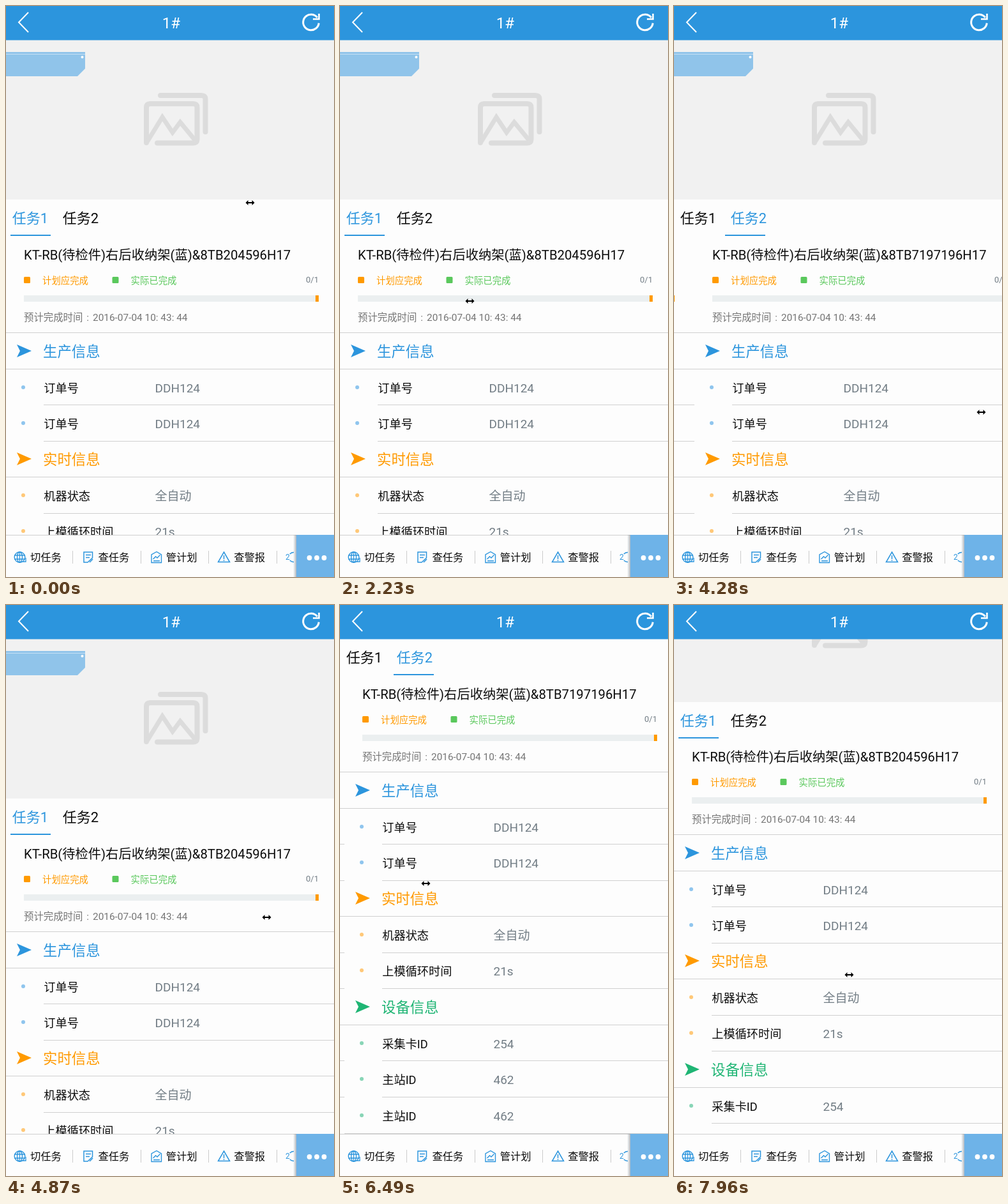
Write an HTML page with a canvas that moves like this. It is 514x894 px and loops after 8000 ms.

```html
<!DOCTYPE html>
<html lang="zh-CN">
<head>
<meta charset="utf-8">
<title>任务</title>
<style>
html, body { margin: 0; width: 100%; height: 100%; overflow: hidden; background: #fdfdfd; }
canvas { display: block; width: 514px; height: 894px; }
</style>
</head>
<body>
<canvas id="stage" width="514" height="894"></canvas>
<script>
const ctx = document.getElementById('stage').getContext('2d');
const W = 514, H = 894, TOP = 53, BOTTOM = 828, PHOTO = 250;
const PITCH = W + 7, ROW = 56.55;
const LOOP = 8000, STEP = 147.4;
const BLUE = '#2c95dd', ORANGE = '#ff9a00', LIME = '#5ac85c', GREEN = '#1fb574';
const PAPER = '#fdfdfd', INK = '#0c0c0c', GREY = '#727d85', TONE = '#dcdcdc';
const FONT = 'Roboto, "Noto Sans CJK SC", "Noto Sans CJK JP", sans-serif';

const titles = ['KT-RB(待检件)右后收纳架(蓝)&8TB204596H17', 'KT-RB(待检件)右后收纳架(蓝)&8TB7197196H17'];
const sections = [
  { name: '生产信息', color: BLUE, dot: '#8fc5ee', rows: [['订单号', 'DDH124'], ['订单号', 'DDH124']] },
  { name: '实时信息', color: ORANGE, dot: '#ffc878', rows: [['机器状态', '全自动'], ['上模循环时间', '21s']] },
  { name: '设备信息', color: GREEN, dot: '#88d5b6', rows: [['采集卡ID', '254'], ['主站ID', '462'], ['主站ID', '462']] }
];

// Motion, in steps of STEP ms
const ease = u => { u = Math.min(1, Math.max(0, u)); return u * u * (3 - 2 * u); };
const visits = [18, 24.86, 29.45, 44.2];   // moments when the second page is fully in view
const pageAt = i => Math.max(...visits.map(v => ease(1 - Math.abs(i - v) / 3)));
const scrollAt = i => PHOTO * ease((i - 33) / 3) - 98.5 * ease((i - 48) / 6);
const pointer = [[0, 382.5, 308], [8, 101, 531], [15, 203.5, 462], [24, 328.5, 580],
  [29, 481.5, 636], [36, 360.5, 393], [44, 134.5, 436], [54, 274.5, 579]];

function pointerAt(i) {
  const n = Math.max(1, pointer.findIndex(k => k[0] >= i));
  const [i0, x0, y0] = pointer[n - 1], [i1, x1, y1] = pointer[n];
  const u = ease((i - i0) / (i1 - i0));
  return [x0 + (x1 - x0) * u, y0 + (y1 - y0) * u];
}

function text(str, x, y, size, color, align = 'left') {
  ctx.font = size + 'px ' + FONT;
  ctx.textAlign = align;
  ctx.fillStyle = color;
  ctx.fillText(str, x, y);
}
function rect(x, y, w, h, color) {
  ctx.fillStyle = color;
  ctx.fillRect(x, y, w, h);
}
function fill(path, color) {
  ctx.fillStyle = color;
  ctx.fill(new Path2D(path));
}
function stroke(path, color, width) {
  ctx.strokeStyle = color;
  ctx.lineWidth = width;
  ctx.stroke(new Path2D(path));
}
function oval(x, y, rx, ry) {
  ctx.beginPath();
  ctx.ellipse(x, y, rx, ry, 0, 0, 7);
}
function dot(x, y, r, color) {
  oval(x, y, r, r);
  ctx.fillStyle = color;
  ctx.fill();
}
function inBox(x, y, w, h, paint) {
  ctx.save();
  ctx.beginPath();
  ctx.rect(x, y, w, h);
  ctx.clip();
  paint();
  ctx.restore();
}

function picture() {
  rect(0, TOP, W, PHOTO, '#f1f1f1');
  ctx.lineCap = 'round';
  stroke('M242 140H306Q312.5 140 312.5 146V197', TONE, 8);
  stroke('M220 214V159Q220 153 226 153H293Q299.5 153 299.5 159V208Q299.5 214.5 293 214.5H237', TONE, 8);
  ctx.lineCap = 'butt';
  stroke('M221 213L245 174L261 198L273 182L297 211', TONE, 7);
  fill('M0 72H124V98L112 110H0Z', '#90c4ea');
  rect(0, 75, 124, 1, '#c6e0f4');
  dot(119.5, 80, 2, '#fff');
}

function tabs(p) {
  const active = Math.round(p);
  for (let n = 0; n < 2; n++) text('任务' + (n + 1), 38 + 79 * n, 340, 22, n === active ? BLUE : INK, 'center');
  rect(Math.round(7 + 78 * p), 358, 63, 2, BLUE);
}

function legend(x, label, color) {
  ctx.beginPath();
  ctx.roundRect(x, 424, 10, 10, 1.5);
  ctx.fillStyle = color;
  ctx.fill();
  text(label, x + 29, 435, 14.4, color);
}

function slotLine(slot) {
  const x = slot === 0 || slot % 3 === 1 ? 0 : 59;
  rect(x, Math.round(511 + ROW * slot), PITCH - x, 1, 'rgba(0,0,0,.18)');
}

function page(n) {
  text(titles[n], 28, 397, 20.3, INK);
  legend(28, '计划应完成', ORANGE);
  legend(166.5, '实际已完成', LIME);
  text('0/1', 490, 433, 13, GREY, 'right');
  rect(28, 453, 462, 10, '#ebeff0');
  rect(485, 453, 5, 10, ORANGE);
  text('预计完成时间', 28, 493, 15.4, '#757575');
  text(':', 128, 493, 15.4, '#757575', 'center');
  text('2016-07-04 10: 43: 44', 136, 493, 15.4, '#757575');

  sections.forEach((s, k) => {
    const y = Math.round(539.7 + ROW * 3 * k);
    slotLine(3 * k);
    fill(`M17 ${y - 10}L40 ${y}L17 ${y + 10}L22 ${y}Z`, s.color);
    text(s.name, 58, y + 9, 22.4, s.color);
    s.rows.slice(0, 2 + n).forEach(([label, value], r) => {
      const ry = Math.round(y + ROW * (r + 1));
      slotLine(3 * k + r + 1);
      dot(27, ry, 3, s.dot);
      text(label, 59.3, ry + 7.5, 18.2, INK);
      text(value, 233.5, ry + 7.5, 19, GREY);
    });
  });
  slotLine(9 + n);
}

function header() {
  rect(0, 0, W, TOP + .5, BLUE);
  stroke('M35 10L20 25.5L35 41', '#fff', 2);
  text('1#', 259, 35, 24, '#fff', 'center');
  ctx.beginPath();
  ctx.arc(478, 25.5, 12.3, .1, Math.PI * 2 - .65);
  ctx.lineWidth = 3;
  ctx.stroke();
  stroke('M490.5 12V20.5H481', '#fff', 2.6);
}

function icons() {
  ctx.strokeStyle = BLUE;
  ctx.lineWidth = 1.4;
  for (const rx of [8.3, 4]) {
    oval(21.5, 863, rx, 8.3);
    ctx.stroke();
  }
  stroke('M13 860H30M13 866H30M21.5 855V871M26 870H31V864', BLUE, 1.3);
  stroke('M128 871H122V855H135.5V864ZM125 859.5H133M125 863.5H131M131 871L136 866', BLUE, 1.5);
  stroke('M228 859V871.5H243.5V859L236 854.5ZM230.5 866L234.5 862L237 864L241.5 859.5M231 868.8H241', BLUE, 1.4);
  stroke('M341.5 855L350.5 870.5H332.5ZM341.5 860V866M341.5 867.3V869', BLUE, 1.5);
  inBox(430, 850, 21, 30, () => {
    oval(450.5, 863, 7.5, 7.5);
    ctx.stroke();
    rect(437, 858, 8.5, 10, PAPER);
    text('2', 438, 867, 12, BLUE);
  });
}

function footer() {
  rect(0, BOTTOM, W, H - BOTTOM, PAPER);
  rect(0, BOTTOM, W, 1, '#cfcfcf');
  icons();
  ['切任务', '查任务', '管计划', '查警报'].forEach((s, i) => {
    text(s, 38 + i * 106.4, 869, 16.3, INK);
    rect(104 + Math.round(i * 106.6), 853, 1, 20, '#ccc');
  });
  const fade = ctx.createLinearGradient(450, 0, 455, 0);
  fade.addColorStop(0, 'rgba(120,130,140,0)');
  fade.addColorStop(1, 'rgba(120,130,140,.55)');
  rect(450, BOTTOM, 5, H - BOTTOM, fade);
  rect(455, BOTTOM, W - 455, H - BOTTOM, '#6eb3e8');
  for (let i = 0; i < 3; i++) dot(475.5 + i * 11.5, 864, 3.9, '#fff');
}

function cursor(x, y) {
  x = Math.floor(x) + .5;
  y = Math.round(y);
  for (const d of [-1, 1]) fill(`M${x + 7 * d} ${y}L${x + 3 * d} ${y - 4}V${y + 4}Z`, '#000');
  rect(x - 4, y - 1, 8, 2, '#000');
}

function draw(time) {
  const i = Math.floor((time % LOOP + 7) / STEP);
  const p = pageAt(i), scroll = scrollAt(i);
  rect(0, 0, W, H, PAPER);
  inBox(0, TOP, W, BOTTOM - TOP, () => {
    ctx.translate(0, -Math.floor(scroll));
    picture();
    tabs(p);
    ctx.translate(-Math.round(p * PITCH), Math.floor(scroll) - Math.ceil(scroll));
    for (let n = 0; n < 2; n++) {
      inBox(0, 362, PITCH, H, () => page(n));
      ctx.translate(PITCH, 0);
    }
  });
  header();
  footer();
  cursor(...pointerAt(i));
}

const start = performance.now();
function tick() {
  draw(performance.now() - start);
  requestAnimationFrame(tick);
}
tick();
</script>
</body>
</html>
```
